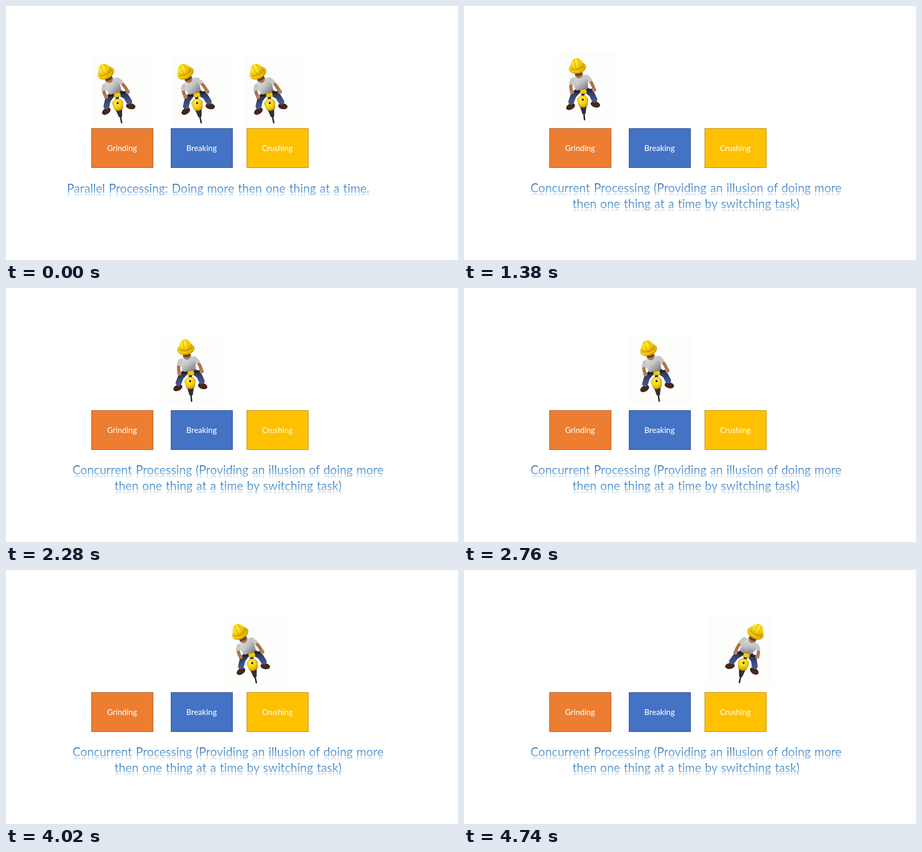
Recreate the animation shown at these times as an HTML page. Size 853x480 px, loop 4800 ms.

```html
<!DOCTYPE html>
<html lang="en">
<head>
<meta charset="utf-8">
<title>Parallel and concurrent processing</title>
<style>
  html, body { margin: 0; width: 100%; height: 100%; overflow: hidden; background: #fff; }
  svg { display: block; width: 853px; height: 480px; }
  text { font-family: Lato, Inter, sans-serif; text-anchor: middle; font-variant-ligatures: none; }
  .label { font-size: 14.9px; font-weight: 500; fill: #fff; }
  .title { font-size: 22.7px; word-spacing: 1.1px; }
</style>
</head>
<body>
<svg viewBox="0 0 853 480">
  <defs>
    <radialGradient id="hat" cx=".4" cy=".3" r=".75">
      <stop offset="0" stop-color="#fff04a"/>
      <stop offset=".55" stop-color="#fbd408"/>
      <stop offset="1" stop-color="#c99400"/>
    </radialGradient>
    <linearGradient id="shirt" x2=".5" y2="1">
      <stop offset="0" stop-color="#e4e4e4"/>
      <stop offset=".55" stop-color="#c4c4c6"/>
      <stop offset="1" stop-color="#85858b"/>
    </linearGradient>
    <linearGradient id="jeans" x2="0" y2="1">
      <stop offset="0" stop-color="#232c4c"/>
      <stop offset="1" stop-color="#43568c"/>
    </linearGradient>

    <!-- The worker stands around the drill tip at 0,0 -->
    <g id="worker">
      <rect x="-57.5" y="-127.5" width="117" height="134" fill="#fdfdfb"/>
      <g id="body" stroke-linecap="round" stroke-linejoin="round">
        <g fill="#4b2618" stroke="#2c130c">
          <ellipse cx="-24" cy="-28" rx="8.5" ry="5" transform="rotate(-22 -24 -28)"/>
          <ellipse cx="23" cy="-28" rx="8.5" ry="5" transform="rotate(22 23 -28)"/>
        </g>
        <path d="M-5-59 L-17-48 L-22-37 M6-59 L18-48 L22-37" fill="none" stroke="url(#jeans)" stroke-width="11"/>
        <g id="torso">
          <path d="M-7-86 Q-14-85-16-77 L-11-58 Q0-53 11-58 L16-77 Q14-85 7-86Z" fill="url(#shirt)"/>
          <ellipse cy="-88" rx="7.5" ry="8" fill="#a87752"/>
          <path d="M-7-93 Q0-86 7-93 V-87 Q0-83-7-87Z" fill="#5c3d2a"/>
          <ellipse cy="-100" rx="16" ry="10.5" fill="url(#hat)" stroke="#c69500" stroke-width=".7"/>
          <path d="M-12.5-100 C-13-125 13-125 12.5-100 Q0-92-12.5-100Z" fill="url(#hat)"/>
          <path d="M-12-100 Q0-93 12-100" fill="none" stroke="#b88700"/>
          <path d="M-3-117 Q-4-107-3-98 M4-117 Q6-107 4-98" fill="none" stroke="#d5a400" stroke-width="1.2"/>
        </g>
        <path id="arms" fill="none" stroke="#a87350" stroke-width="6"/>
        <path id="sleeves" fill="none" stroke="#c6c6c8" stroke-width="7.5"/>
        <path d="M-18-55 L23-56" stroke="#24242a" stroke-width="4.5"/>
        <g fill="#b57f59">
          <circle cx="-19" cy="-55" r="4"/>
          <circle cx="23" cy="-56" r="4"/>
        </g>
        <path d="M2-52 L0-43" stroke="#1c1c20" stroke-width="6"/>
        <rect x="-3.5" y="-58" width="12" height="8" rx="2" fill="#f2c90c" stroke="#a98500" stroke-width=".7"/>
        <path d="M-6.5-28 H6.5 L3-12 H-3Z" fill="#34302c"/>
        <path d="M0-13 V-1" stroke="#28282c" stroke-width="2.8"/>
        <path d="M-6-45 Q0-49 6-45 L10-40 L7.5-27 Q0-22-7.5-27 L-10-40Z" fill="url(#hat)" stroke="#a98500" stroke-width=".7"/>
        <circle cy="-39" r="2" fill="#1c1c20"/>
      </g>
    </g>
  </defs>

  <g id="parallel">
    <use href="#worker" x="218.5" y="221.5"/>
    <use href="#worker" x="368.5" y="221.5"/>
    <use href="#worker" x="505.5" y="221.5"/>
  </g>
  <g id="concurrent">
    <use id="mover" href="#worker"/>
  </g>
  <g id="boxes"></g>
</svg>
<script>
const LOOP = 4800, SWITCH = 1070, TICK = 60, SWING = 1440;
const $ = id => document.getElementById(id);

const boxes = [
  ["Grinding", 161, "#ed7d31", "#ae5a21"],
  ["Breaking", 311, "#4472c4", "#2f528f"],
  ["Crushing", 454, "#ffc000", "#bc8c00"]
];
$("boxes").innerHTML = boxes.map(([name, x, fill, edge]) => `
  <rect x="${x + .5}" y="231.5" width="116" height="74" fill="${fill}" stroke="${edge}"/>
  <text class="label" x="${x + 58}" y="274">${name}</text>`).join("");

// Gradient text with a short fading reflection below the baseline
function title(group, id, x, y, words) {
  const text = extra => `<text class="title" x="${x}" y="${y}" fill="url(#${id}ink)" ${extra}>${words}</text>`;
  const down = `gradientUnits="userSpaceOnUse" x1="0" x2="0"`;
  $(group).insertAdjacentHTML("beforeend", `
    <linearGradient id="${id}ink" ${down} y1="${y - 24}" y2="${y + 6}">
      <stop stop-color="#1f4e79"/>
      <stop offset=".5" stop-color="#5b9bd5"/>
      <stop offset="1" stop-color="#9dc3e6"/>
    </linearGradient>
    <linearGradient id="${id}fade" ${down} y1="${y}" y2="${y + 8}">
      <stop stop-color="#fff" stop-opacity=".75"/>
      <stop offset="1" stop-color="#fff" stop-opacity="0"/>
    </linearGradient>
    <mask id="${id}mask" maskUnits="userSpaceOnUse" x="0" y="${y}" width="853" height="14">
      <rect y="${y}" width="853" height="14" fill="url(#${id}fade)"/>
    </mask>
    <g mask="url(#${id}mask)" aria-hidden="true">${text(`transform="matrix(1 0 0 -1 0 ${2 * y + 2})"`)}</g>
    ${text("")}`);
}
title("parallel", "p", 400.5, 353, "Parallel Processing: Doing more then one thing at a time.");
title("concurrent", "c", 419, 352, "Concurrent Processing (Providing an illusion of doing more");
title("concurrent", "d", 419, 382, "then one thing at a time by switching task)");

function smooth(t, start, length) {
  const u = Math.min(1, Math.max(0, (t - start) / length));
  return u * u * (3 - 2 * u);
}

const WAIST = -62;
function pose(lean) {
  const bend = 16 * lean, r = bend * Math.PI / 180;
  $("body").setAttribute("transform", `rotate(${12 * lean})`);
  $("torso").setAttribute("transform", `rotate(${bend} 0 ${WAIST})`);
  let arms = "", sleeves = "";
  for (const side of [-1, 1]) {
    const sx = 14 * side, sy = -18;
    const x = sx * Math.cos(r) - sy * Math.sin(r);
    const y = WAIST + sx * Math.sin(r) + sy * Math.cos(r);
    const hx = side < 0 ? -19 : 23, hy = -55.5;
    const ex = (x + hx) / 2 + 5 * side, ey = (y + hy) / 2 + 1;
    arms += `M${x} ${y}Q${ex} ${ey} ${hx} ${hy}`;
    sleeves += `M${x} ${y}L${x + (ex - x) * .45} ${y + (ey - y) * .45}`;
  }
  $("arms").setAttribute("d", arms);
  $("sleeves").setAttribute("d", sleeves);
}

function draw(now) {
  const t = now % LOOP, q = Math.floor(t / TICK) * TICK;
  const together = t < SWITCH;
  $("parallel").style.display = together ? "" : "none";
  $("concurrent").style.display = together ? "none" : "";
  pose(-Math.cos((q - (together ? 60 : 1120)) / SWING * 2 * Math.PI));
  const first = smooth(q, 1168, 1422), second = smooth(q, 3125, 1422);
  const x = 218.5 + 150 * first + 151 * second;
  const y = 216 - 1.3 * first - second;
  $("mover").setAttribute("transform", `translate(${x} ${y})`);
}

const began = performance.now();
function frame() {
  draw(performance.now() - began);
  requestAnimationFrame(frame);
}
frame();
</script>
</body>
</html>
```
